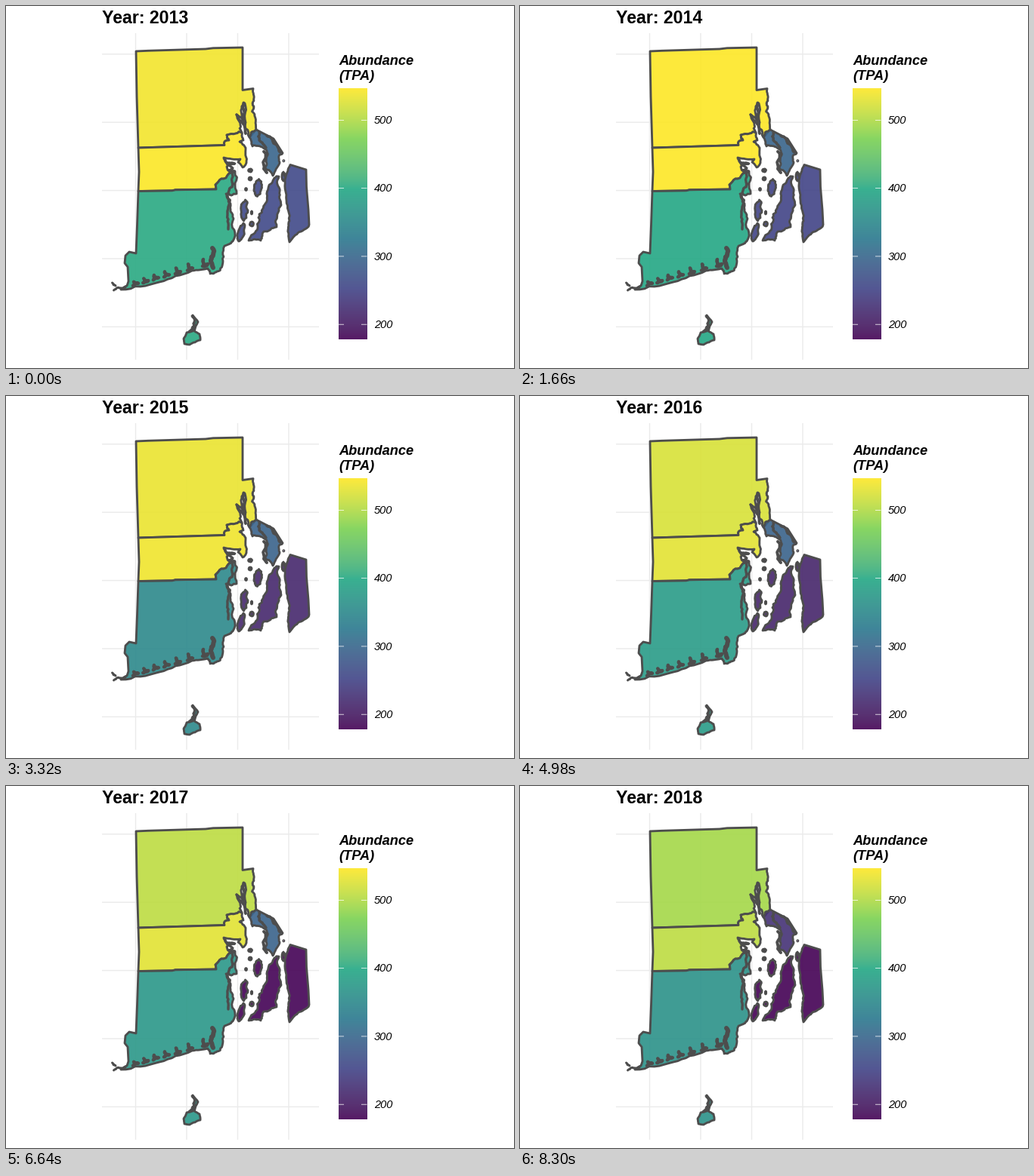
Recreate the animation shown at these times as a matplotlib script. Size 672 by 480 pixels, loop 9.96 s.

```python
import numpy as np
import matplotlib.pyplot as plt
from matplotlib.animation import FuncAnimation
from matplotlib.patches import Polygon

W, H, DPI = 672, 480, 96
PX = 72 / DPI
EDGE, GRID = "#4D4D4D", "#EBEBEB"
ALPHA = 0.9
LOW, HIGH = 178, 547
rng = np.random.default_rng(8)

# ---------- colour scale: six stops blended in Lab space ----------
STOPS = ["#440154", "#414487", "#2A788E", "#22A884", "#7AD151", "#FDE725"]
XYZ = np.array([[0.4124, 0.3576, 0.1805],
                [0.2126, 0.7152, 0.0722],
                [0.0193, 0.1192, 0.9505]])
WHITE = XYZ.sum(axis=1)
OPP = np.array([[0, 1.16, 0], [5, -5, 0], [0, 2, -2]])


def to_lab(rgb):
    lin = np.where(rgb > 0.04045, ((rgb + 0.055) / 1.055) ** 2.4, rgb / 12.92)
    t = lin @ XYZ.T / WHITE
    f = np.where(t > 0.008856, np.cbrt(t), 7.787 * t + 16 / 116)
    return f @ OPP.T


def to_rgb(lab):
    # the constant part of L cancels, so the opponent matrix inverts directly
    f = lab @ np.linalg.inv(OPP).T
    t = np.where(f > 0.2069, f ** 3, (f - 16 / 116) / 7.787)
    lin = np.clip((t * WHITE) @ np.linalg.inv(XYZ).T, 0, 1)
    return np.where(lin > 0.0031308, 1.055 * lin ** (1 / 2.4) - 0.055, 12.92 * lin)


STOP_LAB = to_lab(np.array([[int(s[i:i + 2], 16) / 255 for i in (1, 3, 5)]
                            for s in STOPS]))


def shade(value):
    t = np.clip((np.atleast_1d(value) - LOW) / (HIGH - LOW), 0, 1)
    grid = np.linspace(0, 1, len(STOPS))
    lab = np.stack([np.interp(t, grid, STOP_LAB[:, k]) for k in range(3)], axis=1)
    return np.clip(to_rgb(lab), 0, 1)


# ---------- geometry ----------
def coast(pts, amp=0.12, depth=3):
    """Roughen a polyline by displacing midpoints."""
    p = np.array(pts, float)
    for _ in range(depth):
        d = np.diff(p, axis=0)
        normal = np.stack([-d[:, 1], d[:, 0]], axis=1)
        shift = np.clip(rng.normal(0, amp, (len(d), 1)), -0.2, 0.2)
        shift *= np.minimum(1, 14 / (np.hypot(*d.T)[:, None] + 1e-9))
        out = np.empty((2 * len(p) - 1, 2))
        out[::2], out[1::2] = p, (p[:-1] + p[1:]) / 2 + normal * shift
        p = out
    return p


def island(x, y, rx, ry, lean=0):
    """Closed wobbly oval; lean shifts the top to the right."""
    a = np.linspace(0, 2 * np.pi, 9)[:-1]
    u, v = np.cos(a), np.sin(a)
    ring = np.stack([x + rx * u - lean * v, y + ry * v], axis=1)
    return coast(np.vstack([ring, ring[:1]]), 0.11, 2)


def join(*parts):
    return np.vstack([np.array(p, float) for p in parts])


north_line = join([(175, 188)],
                  coast([(289, 184.5), (290, 179), (295, 178), (292, 171),
                         (304, 169), (312, 168)], 0.1, 2))
south_line = join([(175, 245.5), (220, 244.8), (224, 243.8)],
                  coast([(278, 243), (277, 237), (285, 229), (291, 228),
                         (296, 221)], 0.06, 2))

north = join(
    [(172, 60), (188, 59.3), (264, 57), (274, 55.8), (313, 55), (313, 111.5)],
    coast([(327, 109.5), (328, 122), (326, 129), (328, 134), (325.5, 140),
           (329, 146), (331, 164)], 0.07),
    coast([(331, 164), (322, 174), (317, 163), (316, 129), (314, 128),
           (313, 149), (305, 144), (310, 156), (312, 168)], 0.1),
    north_line[::-1], [(173, 120)])

middle = join(
    north_line,
    coast([(312, 168), (314, 178), (309, 180), (317, 188), (318, 208),
           (313, 214), (307, 207), (310, 203), (288, 201), (291, 207),
           (303, 209), (292, 213), (293, 217), (303, 219), (296, 221)], 0.08),
    south_line[::-1], [(176, 220)])

south = join(
    south_line,
    coast([(296, 221), (303, 220), (305, 249), (291, 249), (297, 262),
           (301, 282), (300, 312), (292, 317), (287, 338), (279, 352),
           (270, 355), (267, 348)]),
    coast([(267, 348), (246, 351), (203, 366), (152, 376), (160, 371)], 0.04),
    [(162, 365), (161, 346), (157, 341), (158, 331), (163, 326), (172, 328),
     (173.5, 290)])

block = coast([(247, 410), (254, 419), (249, 431), (256, 435), (257, 443),
               (243, 449), (236, 448), (235, 441), (239, 433), (247, 431),
               (250, 419), (247, 410)], 0.04)

bristol = join(
    [(331, 164), (354, 176)],
    coast([(366, 195), (361, 199), (362, 208), (353, 225), (343, 215),
           (346, 198), (339, 187), (326, 186), (322, 174), (331, 164)], 0.1))

aquidneck = coast([(355, 228), (361, 226), (362, 246), (364, 264), (357, 284),
                   (358, 293), (341, 299), (337, 311), (321, 311), (333, 294),
                   (335, 276), (343, 262), (347, 241), (355, 228)])
sakonnet = join(
    [(376, 210.5), (397, 217), (397.5, 240), (400, 270)],
    coast([(401, 290), (386, 301), (375, 313), (373, 297), (375, 285),
           (371, 258), (370, 227), (376, 210.5)], 0.07))
ovals = [(315.5, 271, 4.5, 14, 1), (333.5, 241, 5, 11.5, 1),
         (311, 300, 4, 12, 3), (323, 218, 2.5, 2), (323, 229, 2, 2),
         (317.5, 243, 1, 1.5), (325, 274, 0.7, 2), (325, 289, 2.5, 3),
         (367.3, 205.3, 0.6, 0.6), (367, 226, 2, 6)]
bay = [aquidneck, sakonnet] + [island(*o) for o in ovals]

# rivers and coves that read as heavy line work: width, then the path
creeks = [
    (4, [(314.5, 129), (313, 150), (317, 169)]),
    (3.5, [(305, 144), (314, 157)]),
    (3.4, [(335, 168), (335, 178), (344, 188)]),
    (3.6, [(345, 172), (356, 183), (364, 194)]),
    (4, [(341, 193), (341, 216), (345, 221)]),
    (3.2, [(290, 203), (300, 215), (294, 218)]),
    (3.4, [(299, 220), (301, 236), (295, 250)]),
    (3.4, [(293, 252), (293, 275), (294, 296)]),
    (6, [(273, 321), (271, 337), (274, 347)]),
    (3, [(140.5, 367), (145, 371)]),
    (3, [(142.5, 377), (150, 374), (158, 373)]),
    (3, [(246, 411), (248, 425), (242, 432)]),
]
# salt ponds along the south shore, closer together toward the west
for u in np.linspace(0, 1, 7):
    px = 262 - 92 * u ** 0.85
    py = 340 + 0.28 * (262 - px)
    creeks.append((4.5, [(px - 1, py - 4 * (1 - u)), (px, py + 3),
                         (px + 5, py + 2), (px - 2, py + 5)]))

regions = [([north], [540, 547, 535, 524, 508, 494]),
           ([middle], [546, 547, 539, 531, 530, 508]),
           ([south, block], [402, 398, 350, 379, 374, 365]),
           ([bristol], [298, 297, 296, 295, 295, 228]),
           (bay, [258, 250, 215, 212, 179, 178])]

# ---------- stage ----------
fig = plt.figure(figsize=(W / DPI, H / DPI), dpi=DPI, facecolor="white")
ax = fig.add_axes([0, 0, 1, 1])
ax.set_axis_off()


def line(xs, ys, color, width, z, cap="butt"):
    ax.plot(xs, ys, color=color, lw=width * PX, snap=False, zorder=z,
            solid_capstyle=cap, solid_joinstyle="round")


for k in range(4):
    line([171.5 + 67.5 * k] * 2, [36, 469], GRID, 1.42, 0)
for k in range(5):
    line([127, 414], [63.8 + 90.4 * k] * 2, GRID, 1.42, 0)

patches = []
for shapes, values in regions:
    group = [Polygon(s, closed=True, ec=EDGE, lw=2.84 * PX, joinstyle="round",
                     zorder=2) for s in shapes]
    for p in group:
        ax.add_patch(p)
    patches.append((group, values))

for width, pts in creeks:
    line(*coast(pts, 0.15).T, EDGE, width, 3, "round")


def label(x, y, text, size, **kw):
    return ax.text(x, y, text, fontsize=size * PX, family="Liberation Sans",
                   color="black", ha="left", va="baseline", **kw)


# ---------- colour bar ----------
X0, X1, TOP, BOTTOM = 439.5, 477.5, 109.3, 442
ramp = shade(np.linspace(HIGH, LOW, 333)) * ALPHA + 1 - ALPHA
ax.imshow(ramp[:, None, :], extent=(X0, X1, BOTTOM, TOP), aspect="auto",
          interpolation="nearest", zorder=1)
for value in range(200, 501, 100):
    y = 422.2 - (value - 200) * 0.9027
    line([X0, X0 + 7.5], [y, y], "white", 0.75, 2)
    line([X1 - 7.5, X1], [y, y], "white", 0.75, 2)
    label(487, y + 4.8, str(value), 14.67, style="italic")

label(440, 78, "Abundance", 18.2, weight="bold", style="italic")
label(440, 98, "(TPA)", 18.2, weight="bold", style="italic")
title = label(127, 23, "", 23.1, weight="bold")

ax.set_xlim(0, W)
ax.set_ylim(H, 0)


def update(i):
    title.set_text(f"Year: {2013 + i}")
    for group, values in patches:
        color = (*shade(values[i])[0], ALPHA)
        for p in group:
            p.set_facecolor(color)
    return [title] + [p for group, _ in patches for p in group]


anim = FuncAnimation(fig, update, frames=6, interval=1660, repeat=True,
                     repeat_delay=0, blit=False)
plt.show()
```
